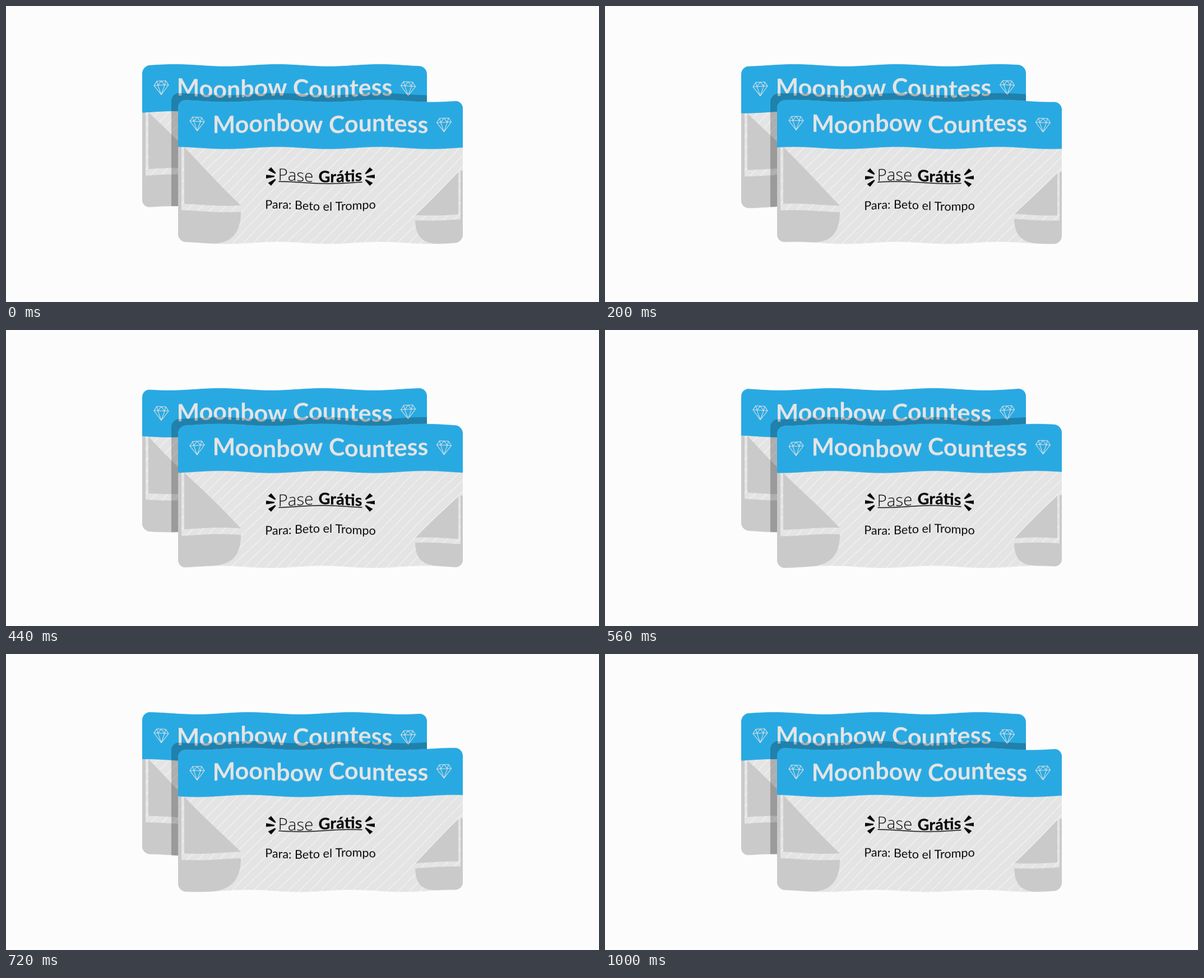
These frames come from a looping animation (1058 by 529 pixels, 1040 ms). An HTML page with a canvas:

```html
<!DOCTYPE html>
<html lang="es">
<head>
<meta charset="utf-8">
<title>Pase Grátis</title>
<style>
  html, body { margin: 0; width: 100%; height: 100%; overflow: hidden; background: #fcfcfc; }
  canvas { display: block; }
</style>
</head>
<body>
<canvas id="stage" width="1058" height="529"></canvas>
<script>
const W = 1058, H = 529, SCALE = 2;
const CARD = { w: 508, h: 253.8, band: 84.1, radius: 14 };
const BACK = [243, 105.8], FRONT = [307, 169.6];
const WAVE = { length: 183, crest: 301, height: 1.9 };
const LOOP = 1040, STEP = 40, STEPS_PER_CYCLE = 25;
const BLUE = '#29a9e2', PAPER = '#e4e4e4', GREY = '#cacaca', STRIPE = '#f4f4f4', INK = '#0a0a0a';

const view = document.getElementById('stage').getContext('2d');
view.imageSmoothingQuality = 'high';
const scene = document.createElement('canvas');
scene.width = W * SCALE;
scene.height = H * SCALE;
const c = scene.getContext('2d');

function at([x, y], draw) {
  c.save();
  c.translate(x, y);
  draw();
  c.restore();
}

function trace(points) {
  c.moveTo(...points[0]);
  points.slice(1).forEach(p => c.lineTo(...p));
}

function polygon(points, color) {
  c.beginPath();
  trace(points);
  c.fillStyle = color;
  c.fill();
}

function clipCard() {
  c.beginPath();
  c.roundRect(0, 0, CARD.w, CARD.h, CARD.radius);
  c.clip();
}

function text(value, x, y, font, color, align = 'center') {
  c.font = font;
  c.textAlign = align;
  c.fillStyle = color;
  c.fillText(value, x, y);
}

function stripes() {
  const run = CARD.h - CARD.band;
  c.beginPath();
  for (let x = -160; x < CARD.w; x += 19.7) {
    trace([[x, CARD.h], [x + run, CARD.band]]);
  }
  c.strokeStyle = STRIPE;
  c.lineWidth = 1.2;
  c.stroke();
}

function hull(x, y, edge, curve) {
  c.beginPath();
  c.moveTo(edge, y);
  c.lineTo(x, y);
  c.bezierCurveTo(...curve);
  c.lineTo(edge, CARD.h);
  c.fillStyle = GREY;
  c.fill();
}

function boats() {
  c.fillStyle = GREY;
  c.fillRect(0, CARD.band, 6, CARD.h);
  polygon([[11, CARD.band], [11, 185.5], [112, 185.5]], GREY);
  hull(112, 197, 0, [112, 235, 95, 254, 56, CARD.h]);

  c.fillRect(504, 125.5, 4, CARD.h);
  polygon([[500, 127], [500, 203], [423.5, 203]], GREY);
  hull(423, 212, CARD.w, [424, 240, 434, 254, 470, CARD.h]);
}

function gem(x) {
  at([x, 41], () => {
    c.beginPath();
    trace([[-8, -11.5], [8, -11.5], [13, -4], [0, 13], [-13, -4], [-8, -11.5], [-6, -4], [0, -11.5], [6, -4], [8, -11.5]]);
    trace([[-13, -4], [13, -4]]);
    trace([[-6, -4], [0, 13], [6, -4]]);
    c.strokeStyle = PAPER;
    c.lineWidth = 1;
    c.lineJoin = 'round';
    c.stroke();
  });
}

function card() {
  clipCard();
  c.fillStyle = PAPER;
  c.fillRect(0, 0, CARD.w, CARD.h);
  stripes();
  boats();
  c.fillStyle = BLUE;
  c.fillRect(0, 0, CARD.w, CARD.band);
  gem(34);
  gem(474.5);
  text('Moonbow Countess', 254, 56, 'bold 43px Lato, sans-serif', PAPER);
}

// Three wedges beside the heading; side is -1 for left, 1 for right.
function burst(side) {
  const slanted = flip => [[93.5, 11.5 * flip], [88, 16.5 * flip], [79.5, 6.2 * flip], [81, 4.5 * flip]];
  c.save();
  c.translate(254, 136.8);
  c.scale(side, 1);
  polygon(slanted(-1), INK);
  polygon(slanted(1), INK);
  polygon([[97, -3.3], [97, 3.3], [82, 1.1], [82, -1.1]], INK);
  c.restore();
}

function message() {
  text('Pase', 178.5, 144, '300 29.5px "Open Sans", sans-serif', INK, 'left');
  text('Grátis', 328.5, 144, '800 29px Lato, sans-serif', INK, 'right');
  c.fillStyle = INK;
  c.fillRect(179.5, 145.2, 149, 1.5);
  burst(-1);
  burst(1);
  text('Para: Beto el Trompo', 254, 194.5, '21.6px Lato, sans-serif', INK);
}

function shadow() {
  clipCard();
  c.beginPath();
  c.roundRect(FRONT[0] - BACK[0] - 12, FRONT[1] - BACK[1] - 12, CARD.w, CARD.h, CARD.radius);
  c.fillStyle = 'rgba(0, 0, 0, 0.24)';
  c.fill();
}

function paintScene() {
  c.scale(SCALE, SCALE);
  c.fillStyle = '#fcfcfc';
  c.fillRect(0, 0, W, H);
  at(BACK, card);
  at(BACK, shadow);
  at(FRONT, () => { card(); message(); });
}

// Shift each pixel column vertically along a wave travelling right.
function render(now) {
  const phase = Math.floor((now % LOOP) / STEP) / STEPS_PER_CYCLE;
  view.fillStyle = '#fcfcfc';
  view.fillRect(0, 0, W, H);
  for (let x = 240; x < 818; x++) {
    const turn = (x + 0.5 - WAVE.crest) / WAVE.length - phase;
    const dy = -WAVE.height * Math.cos(2 * Math.PI * turn);
    view.drawImage(scene, x * SCALE, 0, SCALE, H * SCALE, x, dy, 1, H);
  }
  requestAnimationFrame(render);
}

paintScene();
requestAnimationFrame(render);
</script>
</body>
</html>
```
